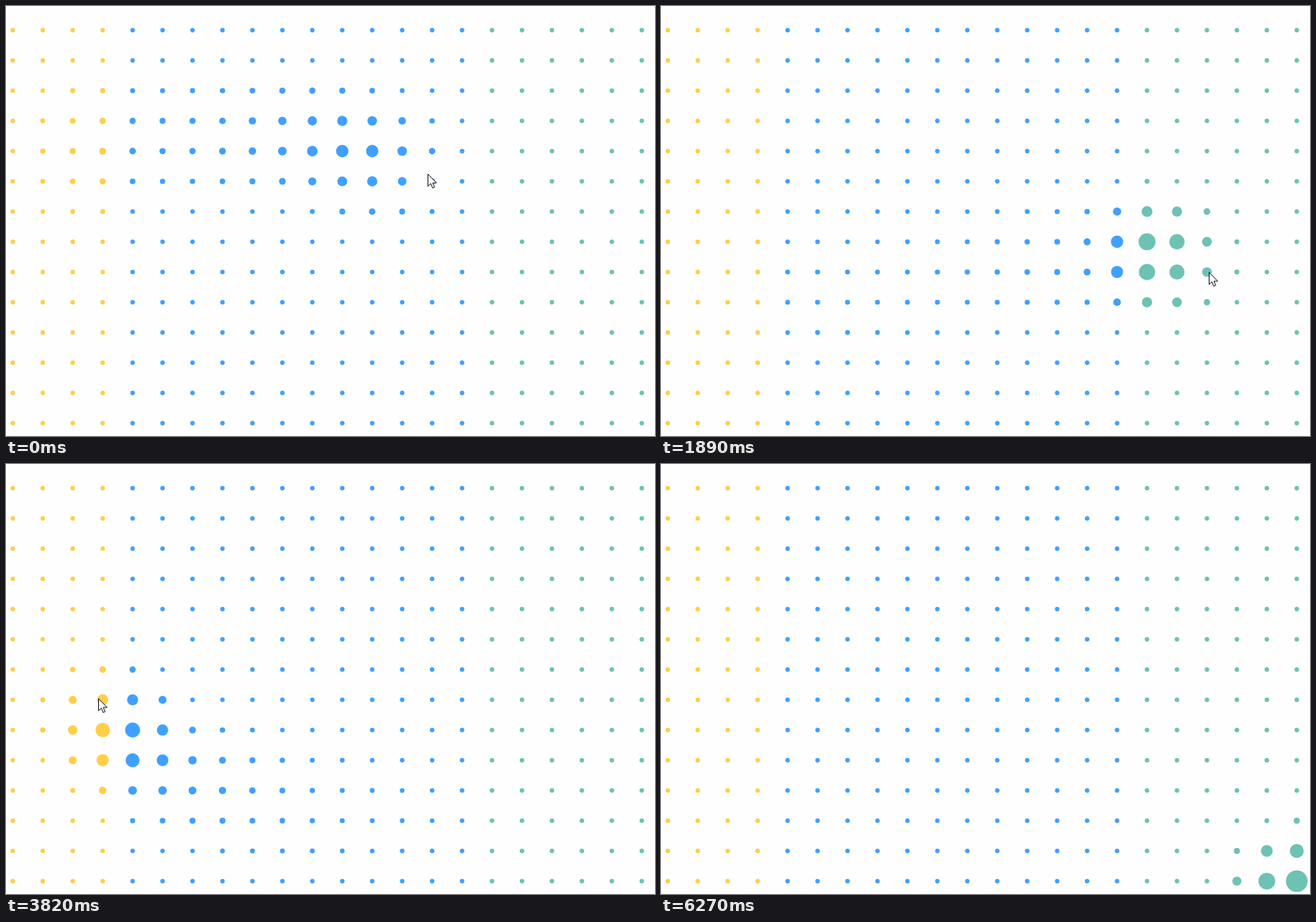
Write an HTML page with a canvas that moves like this. It is 859x569 px and loops after 6.37 s.

```html
<!DOCTYPE html>
<html lang="en">
<head>
<meta charset="utf-8">
<title>Dot grid</title>
<style>
html, body { margin: 0; width: 100%; height: 100%; overflow: hidden; background: #fefefe; }
canvas { display: block; }
</style>
</head>
<body>
<canvas id="stage" width="859" height="569"></canvas>
<script>
const ctx = document.getElementById('stage').getContext('2d');
const LOOP = 6370, STEP = 10;
const COLS = 22, ROWS = 14, BASE = 3, GROWTH = 13.3, REACH = 100;
const DELAY = 60, LAG = 160;

// Key points of the pointer sweep: time, x, y.
// The part before zero leaves the opening trail.
const path = [
  [-480, 115, 187], [-220, 370, 174], [0, 558, 222], [120, 588, 240], [400, 450, 274],
  [760, 152, 268], [890, 110, 318], [1080, 167, 366], [1240, 222, 390], [1480, 500, 338],
  [1620, 635, 326], [1810, 668, 334], [1890, 725, 352], [2200, 745, 420], [2620, 712, 488],
  [3070, 483, 457], [3450, 280, 425], [3640, 165, 375], [3820, 122, 310], [4000, 85, 220],
  [4325, 247, 172], [4640, 493, 154], [4880, 645, 158], [5200, 712, 240], [5710, 838, 565]
];
const first = path[0], last = path[path.length - 1];

function slope(i, axis) {
  const a = path[i - 1], b = path[i + 1];
  return a && b ? (b[axis] - a[axis]) / (b[0] - a[0]) : 0;
}

// Cubic Hermite curve through the key points, at rest beyond both ends
function pointer(t) {
  if (t <= first[0]) return first.slice(1);
  if (t >= last[0]) return last.slice(1);
  const i = path.findIndex(p => p[0] > t) - 1;
  const a = path[i], b = path[i + 1], span = b[0] - a[0], u = (t - a[0]) / span;
  const ease = u * u * (3 - 2 * u);
  return [1, 2].map(k =>
    a[k] + (b[k] - a[k]) * ease +
    span * u * (1 - u) * (slope(i, k) * (1 - u) - slope(i + 1, k) * u));
}

const dots = Array.from({ length: COLS * ROWS }, (_, n) => {
  const col = n % COLS;
  return {
    x: 9 + col * 39.643,
    y: 32 + Math.floor(n / COLS) * 40,
    color: col < 4 ? '#ffce49' : col < 16 ? '#40a0ff' : '#6dc2b4'
  };
});

// Each radius trails its target, so the whole loop is worked out once.
const history = [];
const pull = 1 - Math.exp(-STEP / LAG);
let radii = dots.map(() => BASE);
for (let t = -900; t <= LOOP; t += STEP) {
  const [mx, my] = pointer(t - DELAY);
  radii = radii.map((r, n) => {
    const d = Math.hypot(dots[n].x - mx, dots[n].y - my);
    const target = BASE + GROWTH * Math.max(0, 1 - d / REACH);
    return r + (target - r) * pull;
  });
  if (t >= 0) history.push(radii);
}

const arrow = new Path2D('M.5 .5V16.5L4.2 13L6.6 18.8L9.2 17.7L6.8 12.1H11.8Z');

function drawPointer(t) {
  const [x, y] = pointer(t);
  ctx.save();
  ctx.translate(Math.round(x), Math.round(y));
  ctx.fillStyle = '#fff';
  ctx.strokeStyle = '#10101c';
  ctx.fill(arrow);
  ctx.stroke(arrow);
  ctx.restore();
}

// The picture advances in short holds of just under 60 ms.
function hold(t) {
  const start = t < 720 ? Math.floor(t / 60) * 60 : 720 + Math.floor((t - 720) / 58.4) * 58.4;
  return Math.min(6270, Math.ceil(start / STEP) * STEP);
}

function draw(t) {
  ctx.fillStyle = '#fefefe';
  ctx.fillRect(0, 0, 859, 569);
  history[t / STEP].forEach((r, n) => {
    const { x, y, color } = dots[n];
    ctx.fillStyle = color;
    ctx.beginPath();
    ctx.arc(x, y, r, 0, 2 * Math.PI);
    ctx.fill();
  });
  if (t < last[0]) drawPointer(t);
}

const begin = performance.now();
function tick() {
  draw(hold((performance.now() - begin) % LOOP));
  requestAnimationFrame(tick);
}
tick();
</script>
</body>
</html>
```
